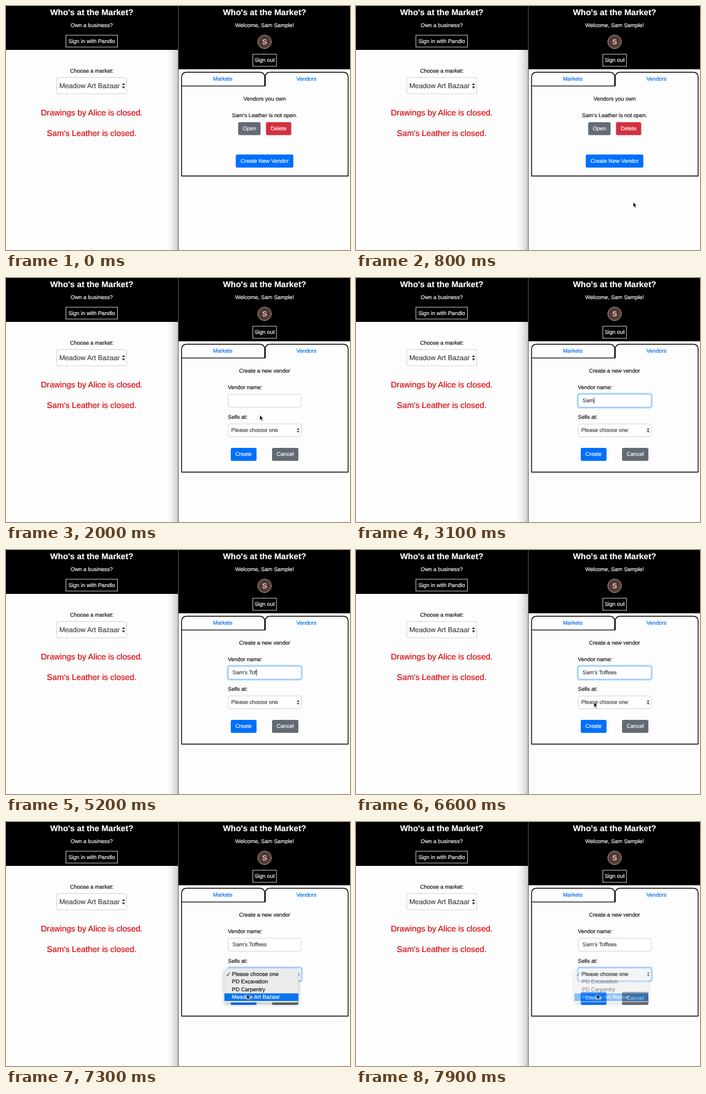
An HTML page that plays this animation: 600x428 px, repeating every 8 s.

```html
<!DOCTYPE html>
<html lang="en">
<head>
<meta charset="utf-8">
<title>Who's at the Market?</title>
<style>
  html, body { margin: 0; width: 100%; height: 100%; overflow: hidden; background: #fdfdfd; }
  svg { display: block; width: 600px; height: 428px; }
  text {
    --ink: #111;
    font: 9.6px "Liberation Sans", Arial, sans-serif;
    fill: var(--ink); stroke: var(--ink); stroke-width: .18;
    white-space: pre; text-rendering: geometricPrecision;
  }
  .mid { text-anchor: middle; }
  .title { font-size: 14.5px; font-weight: bold; }
  .light, .title { --ink: #fff; }
  .big { font-size: 14.4px; --ink: #d90007; }
  .link { --ink: #0a6fe8; }
  .value { --ink: #3a4046; }
  .outline { fill: none; stroke: #d0d0d0; }
  .field { fill: #fff; stroke: #ced4da; }
  .frame { fill: none; stroke: #000; stroke-width: 1.4; }
  .blue { fill: #006ffb; }
  .gray { fill: #626b73; }
  .red { fill: #d42f3f; }
  .focus { stroke: #80bdff; }
  .ring { fill: none; stroke: #007bff; stroke-opacity: .28; stroke-width: 2.4; }
</style>
</head>
<body>
<svg viewBox="0 0 600 428">
  <defs>
    <linearGradient id="shade">
      <stop offset="0" stop-color="#000" stop-opacity="0"/>
      <stop offset=".5" stop-color="#000" stop-opacity=".06"/>
      <stop offset="1" stop-color="#000" stop-opacity=".2"/>
    </linearGradient>
    <filter id="drop" x="-20%" y="-20%" width="140%" height="160%">
      <feDropShadow dx="0" dy="2.5" stdDeviation="3" flood-opacity=".3"/>
    </filter>
    <path id="arrows" d="M-2.9-1.2 0-5 2.9-1.2ZM-2.9 1.2 0 5 2.9 1.2Z" fill="#343a40"/>
  </defs>

  <!-- visitor window -->
  <rect x="280" y="77" width="20" height="351" fill="url(#shade)"/>
  <rect width="300" height="77"/>
  <text class="mid title" x="149.5" y="15.8">Who's at the Market?</text>
  <text class="mid light" x="149.5" y="36.6">Own a business?</text>
  <rect class="outline" x="104.5" y="51.2" width="90" height="20.8"/>
  <text class="mid light" x="149.5" y="64.8">Sign in with Pandlo</text>
  <text class="mid" x="149.5" y="116.5">Choose a market:</text>
  <rect class="field" x="88.5" y="125.5" width="122" height="28.5" rx="2.5"/>
  <text class="value" x="93" y="143.8" style="font-size:12.1px">Meadow Art Bazaar</text>
  <use href="#arrows" x="205" y="140"/>
  <text class="mid big" x="149.5" y="191.8">Drawings by Alice is closed.</text>
  <text class="mid big" x="149.5" y="227.7">Sam's Leather is closed.</text>

  <!-- owner window -->
  <rect x="301" width="299" height="111"/>
  <rect x="300" width="1" height="428" fill="#555"/>
  <text class="mid title" x="451" y="15.8">Who's at the Market?</text>
  <text class="mid light" x="451" y="36.6">Welcome, Sam Sample!</text>
  <circle cx="451" cy="62.8" r="11.8" fill="#553a33" stroke="#ccc" stroke-width=".8"/>
  <text class="mid light" x="451" y="67.2" style="font-size:12px">S</text>
  <rect class="outline" x="430.5" y="84.6" width="41.3" height="21.2"/>
  <text class="mid light" x="451" y="98.3">Sign out</text>
  <path class="frame" d="M306.3 140.4V125q0-8.7 8.7-8.7H442.5q8.7 0 8.7 8.7V140.4ZM452.2 140.4V125q0-8.7 8.7-8.7H588q8.7 0 8.7 8.7V140.4"/>
  <path class="frame" id="panel"/>
  <text class="mid link" x="378" y="131.3">Markets</text>
  <text class="mid link" x="524" y="131.3">Vendors</text>

  <g id="list">
    <text class="mid" x="451" y="165.8">Vendors you own</text>
    <text class="mid" x="451" y="194.6">Sam's Leather is not open.</text>
    <rect class="gray" x="405" y="203.8" width="39" height="22.8" rx="2.5"/>
    <text class="mid light" x="424.5" y="218.4">Open</text>
    <rect class="red" x="453.5" y="203.8" width="44" height="22.8" rx="2.5"/>
    <text class="mid light" x="475.5" y="218.4">Delete</text>
    <rect class="ring" id="newRing" x="400" y="259.6" width="102" height="25" rx="3"/>
    <rect id="newButton" x="400.8" y="260.6" width="100.4" height="22.8" rx="2.5"/>
    <text class="mid light" x="451" y="275">Create New Vendor</text>
  </g>

  <g id="form">
    <text class="mid" x="451" y="165.8">Create a new vendor</text>
    <text x="387" y="194.8">Vendor name:</text>
    <rect class="ring" id="nameRing" x="386.3" y="202.8" width="130" height="25" rx="3.5"/>
    <rect class="field" id="nameField" x="387.5" y="204" width="127.5" height="22.5" rx="2.5"/>
    <text class="value" id="name" x="395" y="218.3"></text>
    <rect id="caret" y="209.5" width=".9" height="11" fill="#222"/>
    <text x="387" y="246.7">Sells at:</text>
    <rect class="ring" id="sellsRing" x="386.3" y="254.8" width="130" height="25" rx="3.5"/>
    <rect class="field" id="sellsField" x="387.5" y="256" width="127.5" height="22.5" rx="2.5"/>
    <text class="value" x="392.8" y="270.2">Please choose one</text>
    <use href="#arrows" transform="translate(509.5 267.3) scale(.8)"/>
    <rect class="blue" x="392" y="298" width="45" height="22.8" rx="2.5"/>
    <text class="mid light" x="414.3" y="312.4">Create</text>
    <rect class="gray" x="464" y="298" width="46" height="22.8" rx="2.5"/>
    <text class="mid light" x="487" y="312.4">Cancel</text>
  </g>

  <g id="menu">
    <rect x="381" y="257.5" width="129" height="59" rx="3" fill="#ebebec" filter="url(#drop)"/>
    <rect id="hover" x="381" width="129" height="13.4" fill="#0a74ee"/>
    <path id="check" d="M384.8 267.5l1.9 2.4 3.4-6" fill="none"/>
  </g>

  <g id="cursor">
    <path id="arrow" d="M0 0V8.8L2 7l1.5 3.5 1.5-.7L3.5 6.5H6.3Z" stroke="#fff" stroke-width=".7"/>
    <path id="hand" d="M-1 .6Q0-.7 1 .6V3.5L4.5 4.2Q5.8 4.6 5.5 6L4.7 9.8H-.6L-3.3 5.8Q-3.2 4.5-2 5L-1 6Z" fill="#fff" stroke="#000" stroke-width=".9"/>
    <path id="beam" d="M-2-5Q0-5 0-4Q0-5 2-5M0-4V4M-2 5Q0 5 0 4Q0 5 2 5" fill="none" stroke="#222" stroke-width=".9"/>
  </g>
</svg>
<script>
const LOOP = 8000, STEP = 100, ROW = 13.4, MENU_TOP = 260.4;
const SWITCH = 1500, FOCUS = 2400, OPEN = 6800, FADE = 7800;
const NAME = "Sam's Toffees";
const keyTimes = [2700, 2900, 3100, 3400, 3800, 4400, 4800, 5000, 5200, 5500, 5700, 5900, 6100];
// time, x, y of the pointer; it hides while typing
const paths = [
  [[600, 520, 410], [1000, 447, 278], [1600, 447, 278], [2300, 440, 216], [2700, 440, 216]],
  [[6300, 440, 218], [6500, 415, 267], [6900, 415, 267], [7200, 420, 302], [LOOP, 420, 302]]
];

const el = id => document.getElementById(id);
const show = (id, on) => { el(id).style.display = on ? "" : "none"; };
const focus = (part, on) => {
  show(part + "Ring", on);
  el(part + "Field").classList.toggle("focus", on);
};

const rows = ["Please choose one", "PD Excavation", "PD Carpentry", "Meadow Art Bazaar"].map((label, i) => {
  const row = document.createElementNS("http://www.w3.org/2000/svg", "text");
  row.setAttribute("x", 394);
  row.setAttribute("y", 270 + i * ROW);
  row.textContent = label;
  return el("menu").appendChild(row);
});

function pointerAt(t) {
  const path = paths.find(p => t >= p[0][0] && t < p.at(-1)[0]);
  if (!path) return null;
  const i = path.findIndex(p => p[0] > t);
  const [t0, x0, y0] = path[i - 1], [t1, x1, y1] = path[i];
  const u = (t - t0) / (t1 - t0), k = u * u * (3 - 2 * u);
  return { x: x0 + (x1 - x0) * k, y: y0 + (y1 - y0) * k };
}

function drawPointer(p, t) {
  show("cursor", p);
  if (!p) return;
  el("cursor").setAttribute("transform", `translate(${p.x} ${p.y})`);
  const onForm = t >= SWITCH;
  const shape = !onForm && p.y < 284 ? "hand"
    : onForm && p.y > 204 && p.y < 227 ? "beam" : "arrow";
  for (const id of ["arrow", "hand", "beam"]) show(id, id === shape);
}

function drawName(t) {
  const count = keyTimes.filter(k => k <= t).length;
  const last = count ? keyTimes[count - 1] : FOCUS;
  const active = t >= FOCUS && t < OPEN;
  el("name").textContent = NAME.slice(0, count);
  focus("name", active);
  show("caret", active && Math.floor((t - last) / 500) % 2 === 0);
  el("caret").setAttribute("x", 395 + (count ? el("name").getComputedTextLength() : 0));
}

function drawMenu(p, t) {
  const open = t >= OPEN;
  show("menu", open);
  focus("sells", open);
  if (!open) return;
  const active = Math.max(0, Math.min(3, Math.floor((p.y - MENU_TOP) / ROW)));
  el("menu").style.opacity = t < FADE ? 1 : 1 - (t - FADE + 10) / 200;
  el("hover").setAttribute("y", MENU_TOP + active * ROW);
  el("check").setAttribute("stroke", active ? "#111" : "#fff");
  rows.forEach((row, i) => row.classList.toggle("light", i === active));
}

function draw(now) {
  const t = Math.floor(now % LOOP / STEP) * STEP;
  const p = pointerAt(t), onForm = t >= SWITCH;
  show("list", !onForm);
  show("form", onForm);
  el("panel").setAttribute("d", `M306.3 140V${onForm ? 340.5 : 298.3}H596.7V140`);
  el("newButton").setAttribute("fill", t >= 1000 ? "#0757c2" : "#006ffb");
  show("newRing", t >= 1200);
  drawName(t);
  drawMenu(p, t);
  drawPointer(p, t);
}

const start = performance.now();
function tick() {
  draw(performance.now() - start);
  requestAnimationFrame(tick);
}
tick();
</script>
</body>
</html>
```
